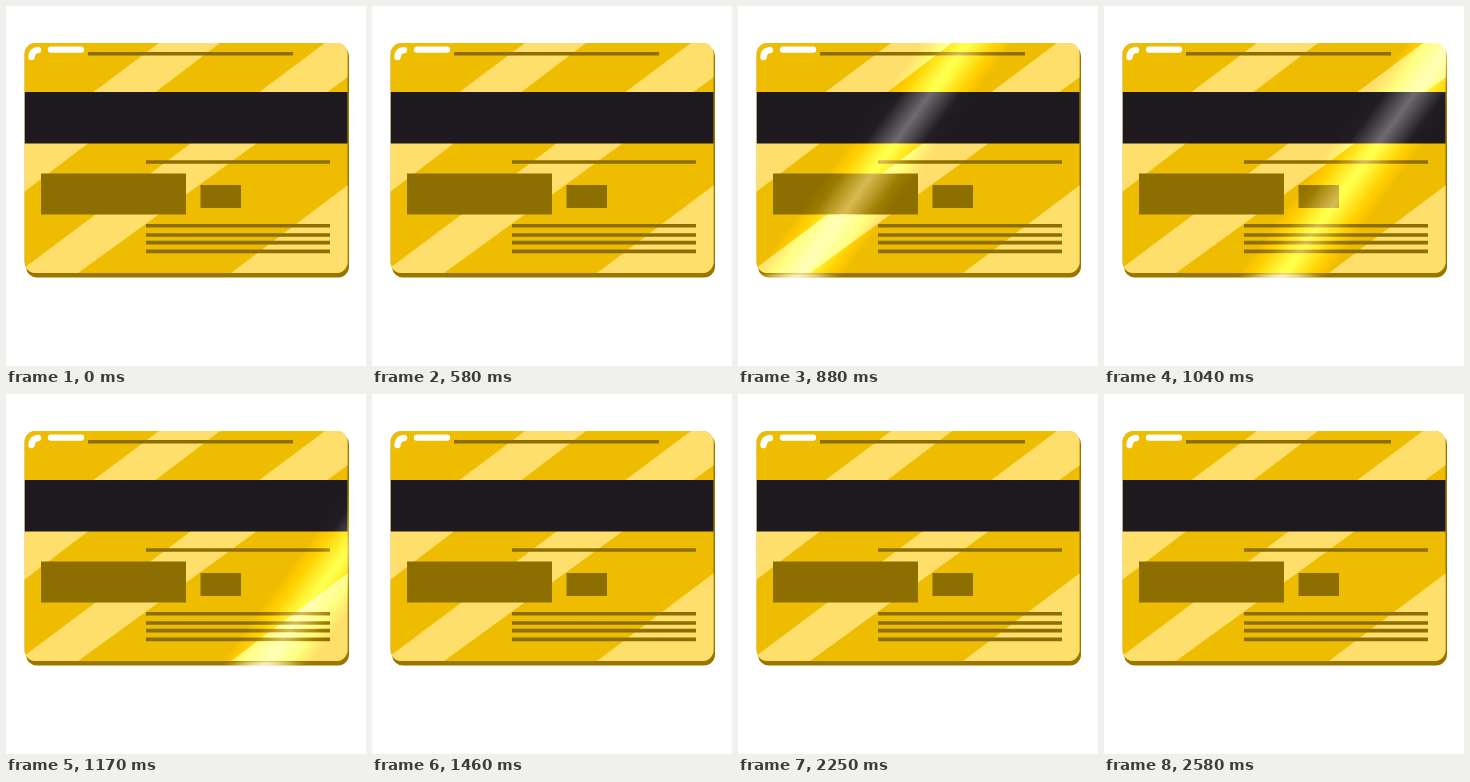
An HTML page without scripts that plays this animation: 360x360 px, repeating every 2620 ms.

```html
<!DOCTYPE html>
<html lang="en">
<head>
<meta charset="utf-8">
<title>Gold card shine</title>
<style>
  html, body { margin: 0; width: 100%; height: 100%; overflow: hidden; background: #fff; }
  svg { display: block; width: 100%; height: 100%; }
  .shine { animation: sweep 2620ms infinite; }
  .dodge { mix-blend-mode: color-dodge; }

  /* One slanted pass per loop, slowing slightly, stepped at 24 fps */
  @keyframes sweep {
    0%     { transform: translate(-195px, 270px) skewX(-36deg); animation-timing-function: step-end; }
    22.14% { transform: translate(-195px, 270px) skewX(-36deg); animation-timing-function: steps(7); }
    33.58% { transform: translate(60px, 270px) skewX(-36deg); animation-timing-function: steps(4); }
    39.69% { transform: translate(178px, 270px) skewX(-36deg); animation-timing-function: steps(8); }
    52%, 100% { transform: translate(395px, 270px) skewX(-36deg); }
  }
</style>
</head>
<body>
<svg viewBox="0 0 360 360">
  <defs>
    <clipPath id="face"><rect x="18.5" y="37" width="323" height="230" rx="11"/></clipPath>
    <clipPath id="card">
      <rect x="18.5" y="37" width="323" height="230" rx="11"/>
      <rect x="20" y="39" width="323" height="232.5" rx="11"/>
    </clipPath>
    <linearGradient id="halo">
      <stop offset="0" stop-color="#000"/>
      <stop offset=".5" stop-color="#484848"/>
      <stop offset="1" stop-color="#000"/>
    </linearGradient>
    <linearGradient id="core">
      <stop offset="0" stop-color="#fff" stop-opacity="0"/>
      <stop offset=".5" stop-color="#fff" stop-opacity=".32"/>
      <stop offset="1" stop-color="#fff" stop-opacity="0"/>
    </linearGradient>
    <radialGradient id="glint">
      <stop offset="0" stop-color="#fffbe0" stop-opacity=".9"/>
      <stop offset="1" stop-color="#fff0a0" stop-opacity="0"/>
    </radialGradient>
  </defs>

  <g clip-path="url(#card)">
    <rect x="18" y="37" width="326" height="235" fill="#987600"/>

    <g clip-path="url(#face)">
      <rect x="18" y="37" width="324" height="230" fill="#eebc00"/>
      <path fill="#ffdf6b" d="M153 37H214L18 186V138Z
        M319 37H342V71L72 267H18V262Z
        M342 179V267H225Z"/>
      <rect x="18" y="86" width="324" height="51.5" fill="#1f1a20"/>
    </g>

    <path fill="#8c6f00" d="M35 167.5H180V208.5H35Z M194.5 179H235V202H194.5Z"/>
    <path stroke="#8c6f00" stroke-width="3.6" d="M82 47.7H287 M140 156H324
      M140 219.8H324 M140 229H324 M140 236.6H324 M140 245.4H324"/>
    <g fill="none" stroke="#fff" stroke-width="6.4" stroke-linecap="round">
      <path d="M25.5 51Q26 44.5 32 44"/>
      <path d="M45 43.6H75"/>
    </g>

    <rect class="shine dodge" x="-46" y="-240" width="92" height="250" fill="url(#halo)"/>
    <rect class="shine" x="-30" y="-240" width="60" height="250" fill="url(#core)"/>
    <ellipse class="shine" rx="42" ry="4" fill="url(#glint)"/>
  </g>
</svg>
</body>
</html>
```
